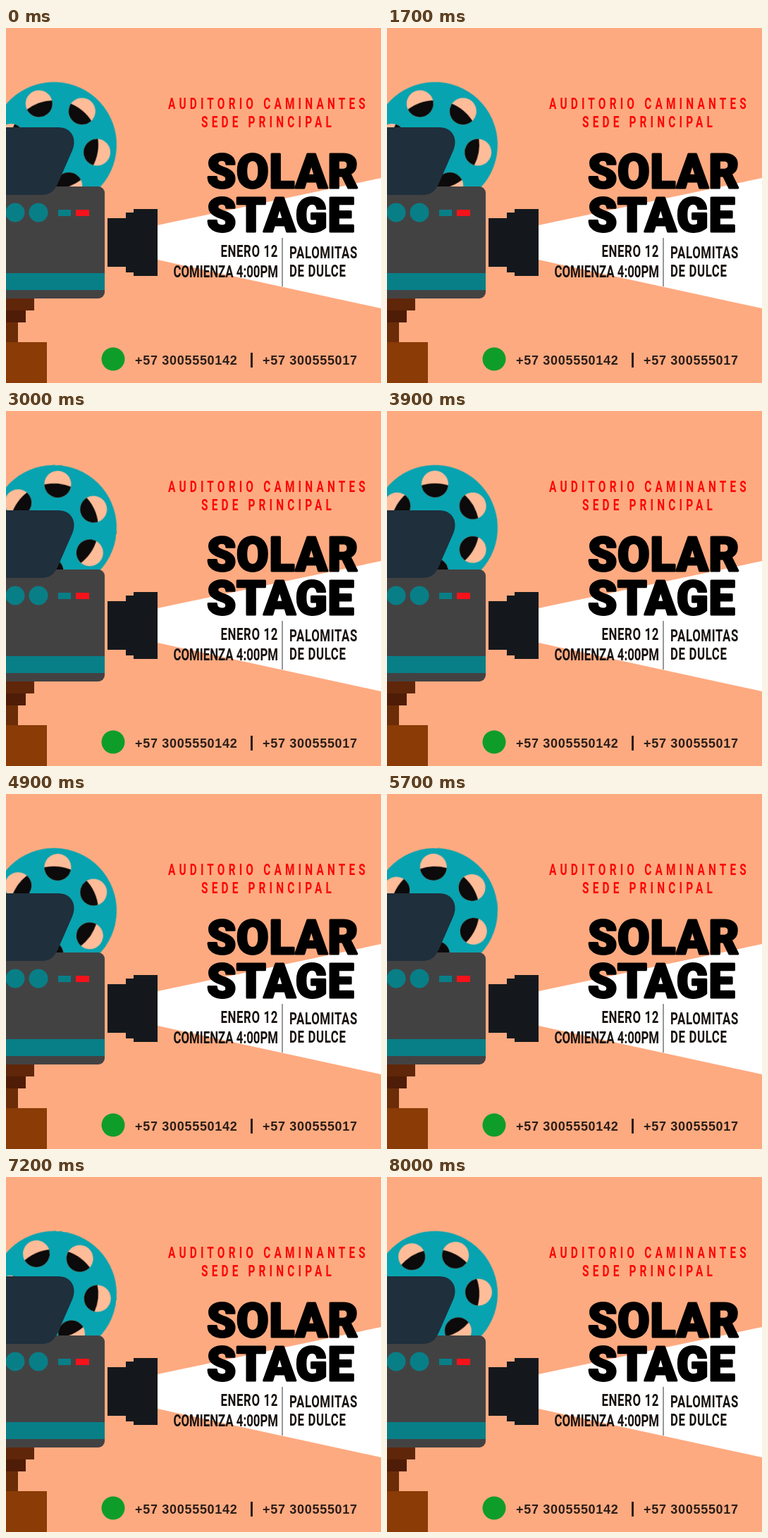
An HTML page for the animation above (8100 ms loop, 532 by 504 pixels).

```html
<!DOCTYPE html>
<html lang="es">
<head>
<meta charset="utf-8">
<title>Solar Stage</title>
<style>
  html, body { margin: 0; width: 100%; height: 100%; overflow: hidden; background: #feaa80; }
  svg { display: block; width: 532px; height: 504px; }
  .place { font: 700 22px Roboto, sans-serif; letter-spacing: 7.4px; fill: #fb0606; }
  .title { font: 900 66px Roboto, sans-serif; letter-spacing: .8px; stroke: #000; stroke-width: 3; stroke-linejoin: round; }
  .info { font: 600 24px Roboto, sans-serif; letter-spacing: .9px; fill: #17120f; }
  .info .tight { letter-spacing: 0; }
  .phone { font: 700 18px "Liberation Sans", Arial, sans-serif; letter-spacing: .7px; fill: #2b1d17; }
  .end { text-anchor: end; }
  .teal { fill: #087f87; }

  /* ten pictures a second; each leg has one step per picture */
  #reel { animation: spin 8.1s infinite; }
  @keyframes spin {
    0% { transform: rotate(-20deg); animation-timing-function: steps(17); }
    20.9877% { transform: rotate(100deg); animation-timing-function: steps(13); }
    37.037% { transform: rotate(185deg); animation-timing-function: steps(9); }
    48.1481% { transform: rotate(240deg); animation-timing-function: steps(10); }
    60.4938% { transform: rotate(305deg); animation-timing-function: steps(16); }
    80.2469% { transform: rotate(411deg); animation-timing-function: steps(15); }
    98.7654% { transform: rotate(508deg); animation-timing-function: steps(1); }
    100% { transform: rotate(520deg); }
  }
</style>
</head>
<body>
<svg viewBox="0 0 532 504" xmlns="http://www.w3.org/2000/svg">
  <defs>
    <clipPath id="cut"><circle cy="-62" r="19"/></clipPath>
    <g id="hole">
      <circle cy="-62" r="19" fill="#ffbc98"/>
      <circle r="63" fill="#0c0a0a" clip-path="url(#cut)"/>
    </g>
  </defs>

  <rect width="532" height="504" fill="#feaa80"/>
  <path d="M215 280L532 213V398L215 329Z" fill="#fff"/>

  <g transform="translate(68 165.7)">
    <g id="reel">
      <circle r="89" fill="#08a3b0"/>
      <use href="#hole"/>
      <use href="#hole" transform="rotate(60)"/>
      <use href="#hole" transform="rotate(120)"/>
      <use href="#hole" transform="rotate(180)"/>
      <use href="#hole" transform="rotate(240)"/>
      <use href="#hole" transform="rotate(300)"/>
    </g>
  </g>

  <!-- stand -->
  <path d="M0 384H40V401H0Z" fill="#602609"/>
  <path d="M0 401H28V418H0Z" fill="#4f1c07"/>
  <path d="M0 418H17V446H0Z" fill="#6b2d08"/>
  <path d="M0 446H58V504H0Z" fill="#8a3b06"/>

  <!-- camera -->
  <rect x="-20" y="225" width="160" height="159" rx="9" fill="#434243"/>
  <path class="teal" d="M0 348H140V372H0Z"/>
  <path d="M0 141H74C93 141 101 157 94 174L73 222C68 232 62 237 50 237H0Z" fill="#1f2f3c"/>
  <circle class="teal" cx="13" cy="262" r="13.5"/>
  <circle class="teal" cx="46" cy="262" r="13.5"/>
  <path class="teal" d="M74 258H92V267H74Z"/>
  <path d="M99 258H118V267H99Z" fill="#f5121a"/>
  <path d="M144 270H170V262H181V257H215V352H181V347H170V339H144Z" fill="#14181c"/>

  <g class="place">
    <text transform="translate(230 115) scale(.7 1)">AUDITORIO CAMINANTES</text>
    <text transform="translate(277 141) scale(.7 1)">SEDE PRINCIPAL</text>
  </g>
  <g class="title">
    <text x="285" y="227">SOLAR</text>
    <text x="285" y="289">STAGE</text>
  </g>
  <g class="info">
    <text class="end" transform="translate(386 325) scale(.7 1)">ENERO 12</text>
    <text class="end tight" transform="translate(386 354) scale(.7 1)">COMIENZA 4:00PM</text>
    <text transform="translate(402 327) scale(.7 1)">PALOMITAS</text>
    <text transform="translate(402 353) scale(.7 1)">DE DULCE</text>
  </g>
  <path d="M392 298V367" stroke="#555" stroke-width="1.2"/>

  <circle cx="152" cy="470" r="16.5" fill="#0f9d2a"/>
  <g class="phone">
    <text x="183" y="478">+57 3005550142</text>
    <text x="364" y="478">+57 300555017</text>
  </g>
  <path d="M348.5 461V482" stroke="#2b1d17" stroke-width="3"/>
</svg>
</body>
</html>
```
